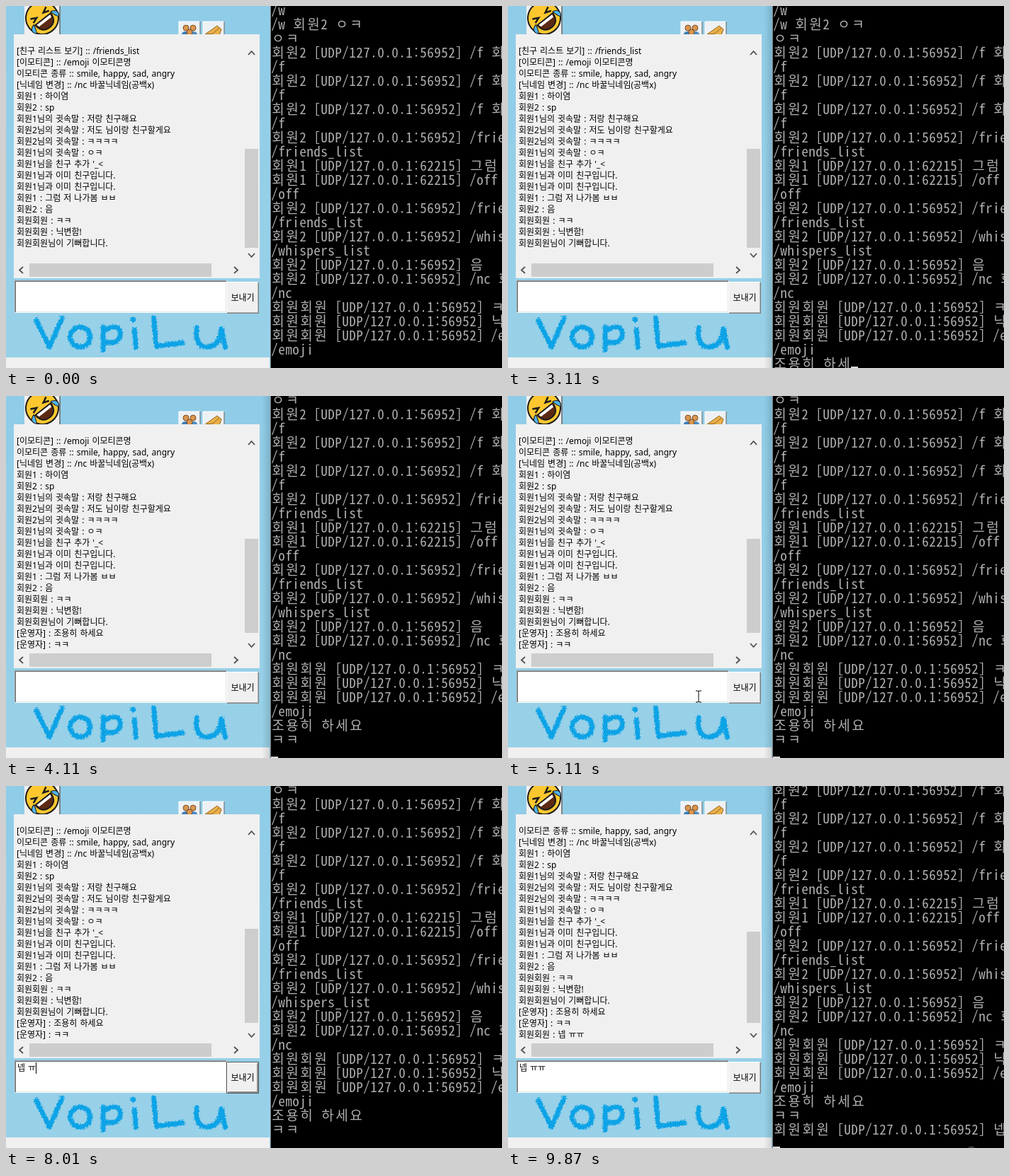
These frames come from a looping animation (700 by 512 pixels, 9970 ms). An HTML page:

```html
<!DOCTYPE html>
<html lang="ko">
<head>
<meta charset="utf-8">
<title>Chat</title>
<style>
html, body { margin: 0; width: 100%; height: 100%; overflow: hidden; background: #000; }
#stage { position: relative; width: 700px; height: 512px; overflow: hidden;
  font: 12px/16px "Noto Sans", "Noto Sans CJK KR", "Noto Sans CJK", sans-serif; color: #000; word-spacing: .9px; }
#stage div, #stage svg { position: absolute; box-sizing: border-box; white-space: pre; }
#stage svg { left: 0; top: 0; }
#app { left: 0; top: 0; width: 373px; height: 512px; overflow: hidden;
  background: linear-gradient(#8fcce7, #94cfe8 45%, #98d1e8); }
#status { left: 0; top: 497px; width: 372px; height: 15px; background: #f0f0f0; }
#panel { left: 11px; top: 40px; width: 347px; height: 345px; background: #f0f0f0; }
#log { left: 15px; top: 56px; width: 321px; height: 305px; overflow: hidden; }
.bar { background: #cdcdcd; }
#thumb { left: 337px; width: 19px; }
#hthumb { left: 33px; top: 364px; width: 257px; height: 19px; }
#field { left: 12px; top: 388px; width: 300px; height: 46px; background: #fff;
  border: 1px solid; border-color: #a0a0a0 #fff #fff #a0a0a0; box-shadow: inset 1px 1px #696969, inset -1px -1px #e3e3e3; }
#input { left: 16px; top: 391px; height: 16px; }
#input.sel { background: #0078d7; color: #fff; }
#input.caret { border-right: 1px solid #000; }
#send { left: 311px; top: 390px; width: 46px; height: 45px; background: #f0f0f0; text-align: center; line-height: 43px;
  border: 1px solid; border-color: #fff #808080 #808080 #fff; box-shadow: inset -1px -1px #b4b4b4; }
#send.on { border-color: #555; box-shadow: inset 1px 1px #fff, inset -2px -2px #909090; }
#shade { left: 361px; top: 0; width: 12px; height: 512px; background: linear-gradient(90deg, #0000, #0002); }
#term { left: 373px; top: 0; width: 327px; height: 512px; background: #000; overflow: hidden; border-left: 1px solid #777;
  color: #b0b0b0; font: 300 19px/20px "Noto Sans Mono CJK KR", "Noto Sans CJK KR", "Noto Sans Mono", monospace; word-spacing: 0; }
#rows { left: 0; top: -5px; }
#rows div { position: static; height: 20px; }
#rows i { display: inline-block; width: 10px; height: 20px; font-style: normal; text-align: center; vertical-align: top; }
#rows i.w { width: 20px; }
#cursor { top: 510px; height: 2px; width: 10px; background: #d8d8d8; }
#arc { left: 647px; top: 510px; width: 14px; height: 14px; border: 1px solid #777; border-radius: 50%; }
#mouse { overflow: visible; }
</style>
</head>
<body>
<div id="stage">
  <div id="app">
    <svg width="373" height="512" fill="none">
      <defs>
        <filter id="rough" x="-5%" y="-15%" width="110%" height="130%">
          <feTurbulence baseFrequency=".35" numOctaves="2" seed="4"/>
          <feDisplacementMap in="SourceGraphic" scale="5" xChannelSelector="R" yChannelSelector="G"/>
        </filter>
        <g id="face">
          <path d="M0 0H30V29H0z" fill="#eef1f3"/>
          <path d="M0 29V0H30" stroke="#fff"/>
          <path d="M0 29H30V0" stroke="#7c8a92" stroke-width="1.5"/>
        </g>
      </defs>
      <path d="M26 0H76V45H26z" fill="#f0f0f0"/>
      <path d="M26 45.5H76V0" stroke="#666" stroke-width="1.5"/>
      <g transform="translate(51 17) rotate(-38)">
        <circle r="23" fill="#fdc82f" stroke="#1c1c1c" stroke-width="2"/>
        <path d="M-14 2H14Q13 17 0 17T-14 2z" fill="#5c2a14" stroke="#1c1c1c" stroke-width="2"/>
        <path d="M-12 3H12L11 7H-11z" fill="#fff"/>
        <path d="M-14 -9L-6 -5L-14 -2M14 -9L6 -5L14 -2" stroke="#1c1c1c" stroke-width="2.5"/>
        <path d="M-15 0Q-25 3 -22 10T-15 0M15 0Q25 3 22 10T15 0" fill="#4fb3ee" stroke="#1c1c1c"/>
      </g>
      <use href="#face" x="244" y="22"/>
      <use href="#face" x="278" y="22"/>
      <path d="M247 45Q247 35 254 36Q260 36 260 45z" fill="#3d7fb8"/>
      <path d="M258 45Q258 35 265 36Q271 36 271 45z" fill="#4b8fc6"/>
      <path d="M253 47Q253 40 259 40Q265 40 265 47z" fill="#2f6ca6"/>
      <g fill="#d9964f" stroke="#7a4a22">
        <circle cx="254" cy="31" r="4"/><circle cx="264" cy="31" r="4"/><circle cx="259" cy="37" r="4"/>
      </g>
      <path d="M281 40L298 28L304 33L301 41L290 45L288 40z" fill="#e9b04a" stroke="#94621c"/>
      <path d="M283 40L292 39L301 31" stroke="#94621c"/>
      <path filter="url(#rough)" stroke="#0fa3e6" stroke-width="7" stroke-linecap="round" stroke-linejoin="round"
        d="M42 444L60 481L78 440M103 453a14 14 0 1 0 1 0M136 453V485M136 458Q160 446 160 462T137 474M180 457L182 481M178 442V443M207 440L211 480L248 475M268 454Q265 482 283 481T303 455L308 481"/>
    </svg>
    <div id="status"></div>
    <div id="panel"></div>
    <div id="log"></div>
    <div id="thumb" class="bar"></div>
    <div id="hthumb" class="bar"></div>
    <svg width="373" height="400" fill="none" stroke="#505050" stroke-width="1.8">
      <path d="M342 69L346.500 64L351 69M342 350L346.500 355L351 350M24 369L19 373.500L24 378M322 369L327 373.500L322 378"/>
    </svg>
    <div id="field"></div>
    <div id="input"></div>
    <div id="send">보내기</div>
    <div id="shade"></div>
  </div>
  <div id="term">
    <div id="rows"></div>
    <div id="cursor"></div>
  </div>
  <div id="arc"></div>
  <svg id="mouse" width="1" height="1">
    <path id="beam" d="M-4 -8H-1L0 -7L1 -8H4M0 -7V7M-4 8H-1L0 7L1 8H4" fill="none" stroke="#000"/>
    <path id="arrow" d="M0 0V16L4 12L7 18L9 17L6 11H11z" fill="#fff" stroke="#000"/>
  </svg>
</div>
<script>
const LOOP = 9970;
const $ = id => document.getElementById(id);

const log = [
  "[친구 리스트 보기] :: /friends_list", "[이모티콘] :: /emoji 이모티콘명",
  "이모티콘 종류 :: smile, happy, sad, angry", "[닉네임 변경] :: /nc 바꿀닉네임(공백x)",
  "회원1 : 하이염", "회원2 : sp", "회원1님의 귓속말 : 저랑 친구해요",
  "회원2님의 귓속말 : 저도 님이랑 친구할게요", "회원2님의 귓속말 : ㅋㅋㅋㅋ",
  "회원1님의 귓속말 : ㅇㅋ", "회원1님을 친구 추가 '_<", "회원1님과 이미 친구입니다.",
  "회원1님과 이미 친구입니다.", "회원1 : 그럼 저 나가봄 ㅂㅂ", "회원2 : 음", "회원회원 : ㅋㅋ",
  "회원회원 : 닉변함!", "회원회원님이 기뻐합니다.", "[운영자] : 조용히 하세요",
  "[운영자] : ㅋㅋ", "회원회원 : 넵 ㅠㅠ"
];

const from = (name, port) => text => `${name} [UDP/127.0.0.1:${port}] ${text}`;
const one = from("회원1", 62215), two = from("회원2", 56952), both = from("회원회원", 56952);
const befriend = [two("/f 회원1"), "/f"];
const console_ = [
  "/w", "/w 회원2 ㅇㅋ", "ㅇㅋ", ...befriend, ...befriend, ...befriend,
  two("/friends_list"), "/friends_list", one("그럼 저 나가봄 ㅂㅂ"), one("/off"), "/off",
  two("/friends_list"), "/friends_list", two("/whispers_list"), "/whispers_list",
  two("음"), two("/nc 회원회원"), "/nc", both("ㅋㅋ"), both("닉변함!"), both("/emoji happy"), "/emoji",
  "조용히 하세요", "ㅋㅋ", both("넵 ㅠㅠ")
];

// Each track is a list of [start ms, value].
const sent = [[0, 0], [3490, 1], [4110, 2], [8240, 3]];
const typed = [[0, ""], [1550, "ㅈ"], [1930, "조"], [2410, "조요"], [2480, "조용"], [2560, "조용히 "],
  [2870, "조용히 하"], [2990, "조용히 핫"], [3110, "조용히 하세"], [3320, "조용히 하세요"],
  [3490, ""], [4030, "ㅋ"], [4110, ""]];
const blink = [[0, 0], [910, 1], [1080, 0], [1380, 1], [1550, 0], [2080, 1], [3490, 0],
  [4110, 1], [5360, 0], [8240, 1]];
const entry = [[0, ""], [5820, "s"], [5900, "sp"], [6050, "spq"], [6530, "spq "], [6840, "spq n"],
  [7390, "spq "], [7470, "spq"], [7550, ""], [7640, "ㄴ"], [7720, "네"], [7810, "넵"],
  [7970, "넵 ㅠ"], [8080, "넵 ㅠㅠ"]];
const thumbs = [[202, 140], [199, 136], [202, 133], [206, 129]];
const moves = [
  { start: 4560, end: 5110, hide: 5820, a: [432, 470], b: [269, 425] },
  { start: 8790, end: 9320, hide: 9320, a: [269, 425], b: [600, 511] }
];

const at = (track, t) => track.findLast(step => step[0] <= t)[1];
const within = (t, a, b) => t >= a && t < b;
const isWide = c => c > "\u1100";
const cells = text => [...text].reduce((n, c) => n + (isWide(c) ? 2 : 1), 0);
const show = (el, on) => { el.style.visibility = on ? "visible" : "hidden"; };

function row(text) {
  const div = document.createElement("div");
  for (const c of text) {
    const i = document.createElement("i");
    i.textContent = c;
    if (isWide(c)) i.className = "w";
    div.append(i);
  }
  return div;
}

let lastTerm, lastSent;

function drawText(n, line) {
  if (n !== lastSent) {
    const top = Math.max(0, n - 1);
    $("log").textContent = log.slice(top, 18 + n).join("\n");
    $("thumb").style.top = thumbs[n][0] + "px";
    $("thumb").style.height = thumbs[n][1] + "px";
    lastSent = n;
  }
  const key = n + line;
  if (key !== lastTerm) {
    $("rows").replaceChildren(...console_.slice(n, 25 + n).concat(line).map(row));
    lastTerm = key;
  }
}

function drawMouse(t) {
  const m = moves.find(m => within(t, m.start, m.hide));
  show($("mouse"), m);
  if (!m) return;
  const p = Math.min(1, (Math.floor((t - m.start) / 80) * 80 + 80) / (m.end - m.start));
  const ease = p * p * (3 - 2 * p);
  const [x, y] = m.a.map((v, i) => Math.round(v + (m.b[i] - v) * ease));
  $("mouse").style.transform = `translate(${x}px, ${y}px)`;
  const inField = x < 312 && y < 434;
  $("beam").style.display = inField ? "" : "none";
  $("arrow").style.display = inField ? "none" : "";
}

function draw(t) {
  const line = at(typed, t), focus = within(t, 5360, 9870), selected = within(t, 8240, 9870);
  drawText(at(sent, t), line);
  $("cursor").style.left = cells(line) * 10 + "px";
  show($("cursor"), at(blink, t));
  $("input").textContent = at(entry, t);
  $("input").className = selected ? "sel" : focus ? "caret" : "";
  $("send").className = focus ? "on" : "";
  show($("shade"), within(t, 360, 5360) || t >= 9870);
  show($("arc"), t >= 9870);
  drawMouse(t);
}

const begin = performance.now();
function tick() {
  draw((performance.now() - begin) % LOOP);
  requestAnimationFrame(tick);
}
tick();
</script>
</body>
</html>
```
